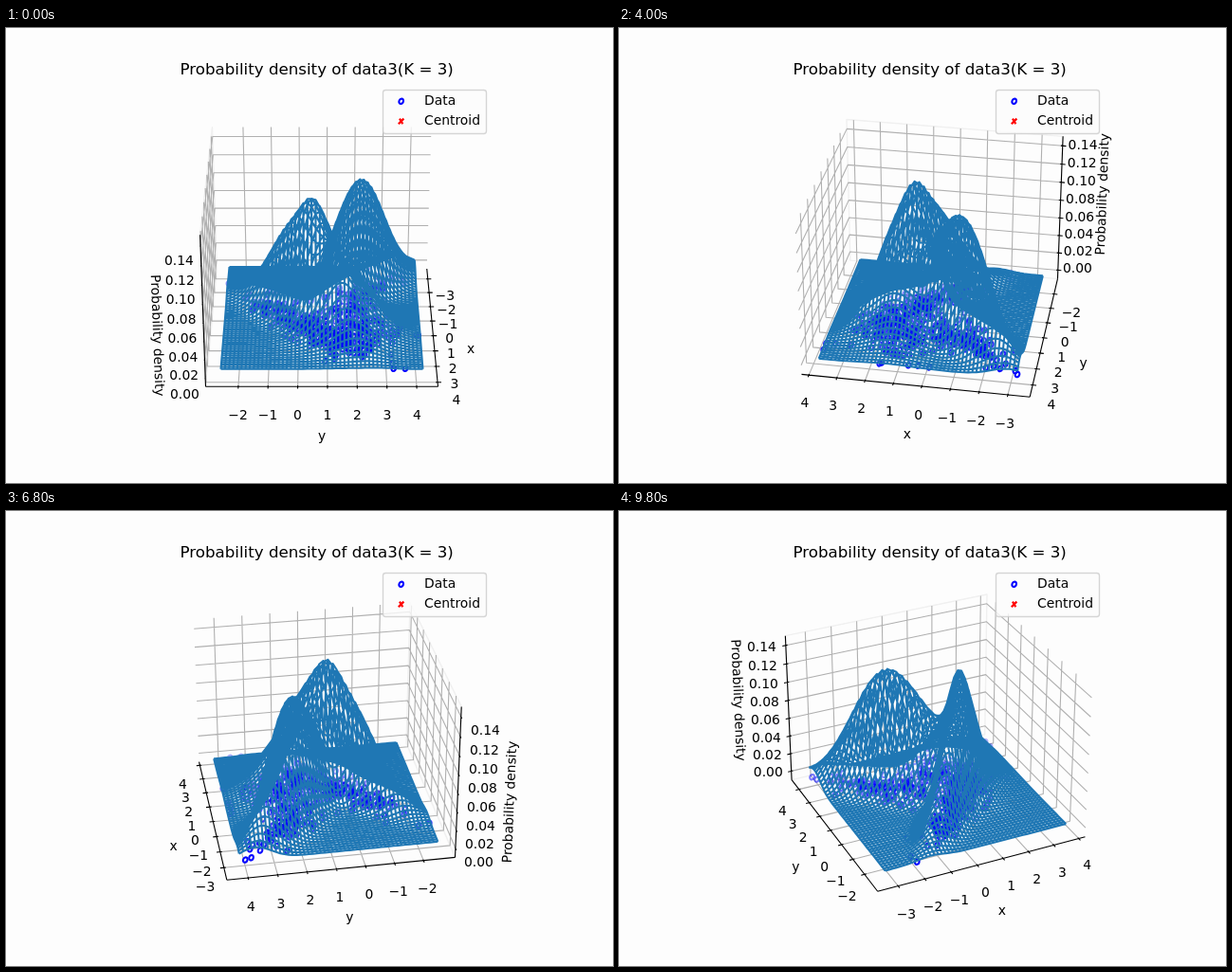
These frames come from a looping animation (640x480 px, 10 s). An HTML page with a canvas:

```html
<!DOCTYPE html>
<html lang="en">
<head>
<meta charset="utf-8">
<title>Probability density</title>
<style>
  html, body { margin: 0; width: 100%; height: 100%; overflow: hidden; background: #fdfdfd; }
  canvas { display: block; }
</style>
</head>
<body>
<canvas id="stage" width="640" height="480"></canvas>
<script>
const ctx = document.getElementById('stage').getContext('2d');
const FRAMES = 50, STEP_MS = 200, STEP_DEG = 5;
const WIRE = '#1f77b4', FONT = '"DejaVu Sans", sans-serif';
const rad = deg => deg * Math.PI / 180;

// Box in view units, centred on the origin; the panes are 1/24 larger than the limits.
const LIMIT = [4 / 7, 4 / 7, 3 / 7];
const PANE = LIMIT.map(v => v * 25 / 24);
const DATA = LIMIT.map(v => v / 1.1);
const DELTA = LIMIT.map(v => v / 6);
const PER_POINT = 48 / 532.2;

const range = (from, to) => Array.from({ length: to - from + 1 }, (_, i) => from + i);
const signed = n => String(n).replace('-', '\u2212');
const AXES = [
  { name: 'x', tickDir: 1, flip: 1, ticks: range(-3, 4).map(n => [(n - 0.25) * 0.1484, signed(n)]) },
  { name: 'y', tickDir: 0, flip: 0, ticks: range(-2, 4).map(n => [(n - 0.81) * 0.1523, signed(n)]) },
  { name: 'Probability density', tickDir: 0, flip: 0,
    ticks: range(0, 7).map(n => [DATA[2] * (n / 3.5 - 1), (n * 0.02).toFixed(2)]) }
];

const CLUSTERS = [
  { x: 0.065, y: -0.115, turn: 47, long: 0.205, wide: 0.056, peak: 0.81, count: 160 },
  { x: -0.18, y: 0.2, turn: 140, long: 0.2, wide: 0.066, peak: 0.97, count: 115 },
  { x: 0.16, y: 0.15, turn: 90, long: 0.14, wide: 0.125, peak: 0.45, count: 190 }
].map(c => ({ ...c, cos: Math.cos(rad(c.turn)), sin: Math.sin(rad(c.turn)) }));

const density = (x, y) => CLUSTERS.reduce((sum, c) => {
  const dx = x - c.x, dy = y - c.y;
  const a = (dx * c.cos + dy * c.sin) / c.long, b = (dy * c.cos - dx * c.sin) / c.wide;
  return sum + c.peak * Math.exp(-(a * a + b * b) / 2);
}, 0);

function makeRandom(seed) {
  return () => {
    seed = (seed + 0x6d2b79f5) | 0;
    let t = Math.imul(seed ^ (seed >>> 15), 1 | seed);
    t = (t + Math.imul(t ^ (t >>> 7), 61 | t)) ^ t;
    return ((t ^ (t >>> 14)) >>> 0) / 4294967296;
  };
}

function makePoints() {
  const random = makeRandom(11);
  const points = [[-0.515, 0.488], [-0.5, 0.455], [-0.34, -0.515], [0.515, 0.37], [0.515, 0.43],
    [-0.06, 0.5], [0, 0.495], [0.05, 0.5], [0.2, 0.51], [0.19, 0.5]];
  for (const c of CLUSTERS) {
    for (let i = 0; i < c.count; i++) {
      const r = Math.sqrt(-2 * Math.log(1 - random())), t = random() * 2 * Math.PI;
      const a = r * Math.cos(t) * c.long, b = r * Math.sin(t) * c.wide;
      const x = c.x + a * c.cos - b * c.sin, y = c.y + a * c.sin + b * c.cos;
      if (Math.max(Math.abs(x), Math.abs(y)) < 0.48) points.push([x, y]);
    }
  }
  return points.map(([x, y]) => [x, y, -DATA[2]]);
}

function makeMesh(n) {
  const at = i => DATA[0] * (2 * i / (n - 1) - 1);
  const index = range(0, n - 1);
  const heights = index.map(i => index.map(j => density(at(i), at(j))));
  const top = Math.max(...heights.flat());
  const vertex = (i, j) => [at(i), at(j), DATA[2] * (2 * heights[i][j] / top - 1)];
  return [...index.map(i => index.map(j => vertex(i, j))),
          ...index.map(j => index.map(i => vertex(i, j)))];
}

const points = makePoints();
const mesh = makeMesh(50);

function makeCamera(azimuth) {
  const c = Math.cos(azimuth), s = Math.sin(azimuth), ce = Math.cos(rad(30)), se = 0.5;
  const project = ([x, y, z]) => {
    const toward = x * c + y * s;
    const depth = 10 - toward * ce - z * se;
    const scale = 369.6 / 0.185 / depth;
    return [333 + (y * c - x * s) * scale, 237.4 - (z * ce - toward * se) * scale, depth];
  };
  // Sign of the pane behind the box along each axis
  const back = [c, s, 1].map(v => (v > -1e-9 ? -1 : 1));
  return { project, back };
}

const withValue = (p, i, v) => p.map((old, k) => (k === i ? v : old));
const outward = (p, axis, points) =>
  p.map((v, k) => (k === axis ? v : v + Math.sign(v) * points * PER_POINT * DELTA[k]));

function strokePaths(paths, color, width) {
  ctx.strokeStyle = color;
  ctx.lineWidth = width;
  ctx.beginPath();
  for (const path of paths) path.forEach(([x, y], k) => (k ? ctx.lineTo(x, y) : ctx.moveTo(x, y)));
  ctx.stroke();
}

function text(str, x, y, size = 13.89, align = 'center') {
  ctx.font = `${size}px ${FONT}`;
  ctx.textAlign = align;
  ctx.fillStyle = '#000';
  ctx.fillText(str, x, y);
}

function drawPanes({ project, back }) {
  const corner = PANE.map((v, k) => v * back[k]);
  const y = corner[1], [w, , h] = PANE;
  const pane = [[-w, y, -h], [w, y, -h], [w, y, h], [-w, y, h], [-w, y, -h]];
  strokePaths([pane.map(project)], '#f0f0f0', 1.39);

  const lines = AXES.flatMap(({ ticks }, i) => ticks.map(([value]) => {
    const bend = withValue(corner, i, value);
    const j = (i + 1) % 3, k = (i + 2) % 3;
    return [withValue(bend, j, -corner[j]), bend, withValue(bend, k, -corner[k])].map(project);
  }));
  strokePaths(lines, '#b0b0b0', 1.11);
}

function drawAxis({ project, back }, { name, tickDir, flip, ticks }, i) {
  const corner = PANE.map((v, k) => v * back[k]);
  const start = withValue(corner, flip, -corner[flip]);
  const from = project(start), to = project(withValue(start, i, -start[i]));
  const side = Math.sign(start[tickDir]) * DELTA[tickDir];
  const paths = [[from, to]];

  for (const [value, label] of ticks) {
    const pos = withValue(start, i, value);
    paths.push([-0.1, 0.2].map(f => project(withValue(pos, tickDir, pos[tickDir] + f * side))));
    const [x, y] = project(outward(pos, i, 11.5));
    text(label, x, y + 10.6);
  }
  strokePaths(paths, '#000', 1.11);

  const [x, y] = project(outward(withValue(start, i, 0), i, 25));
  ctx.save();
  ctx.translate(x, y);
  if (i === 2) ctx.rotate(Math.atan((to[1] - from[1]) / (to[0] - from[0])));
  text(name, 0, 3.8);
  ctx.restore();
}

function ring(x, y) {
  ctx.beginPath();
  ctx.ellipse(x, y, 2.2, 2.8, 0.45, 0, 2 * Math.PI);
  ctx.stroke();
}

function drawPoints({ project }) {
  const seen = points.map(project).sort((a, b) => b[2] - a[2]);
  const far = seen[0][2], near = seen[seen.length - 1][2];
  ctx.strokeStyle = '#00f';
  ctx.lineWidth = 2.1;
  for (const [x, y, depth] of seen) {
    ctx.globalAlpha = 1 - 0.7 * (depth - near) / (far - near);
    ring(x, y);
  }
  ctx.globalAlpha = 1;
}

function drawLegend() {
  ctx.beginPath();
  ctx.roundRect(397.5, 65.5, 109, 46, 2.8);
  ctx.fillStyle = 'rgba(253,253,253,0.8)';
  ctx.fill();
  ctx.strokeStyle = 'rgba(204,204,204,0.8)';
  ctx.lineWidth = 1.39;
  ctx.stroke();
  ctx.strokeStyle = '#00f';
  ctx.lineWidth = 2.1;
  ring(416.7, 77.3);
  strokePaths([[[415, 95.6], [418.3, 101.2]], [[419.4, 95.6], [413.8, 101.2]]], '#f00', 2.2);
  text('Data', 441, 81.3, 13.89, 'left');
  text('Centroid', 441, 102, 13.89, 'left');
}

function draw(frame) {
  const camera = makeCamera(rad(frame * STEP_DEG));
  ctx.fillStyle = '#fdfdfd';
  ctx.fillRect(0, 0, 640, 480);
  ctx.lineJoin = 'round';
  drawPanes(camera);
  AXES.forEach((axis, i) => drawAxis(camera, axis, i));
  drawPoints(camera);
  strokePaths(mesh.map(line => line.map(camera.project)), WIRE, 2.08);
  text('Probability density of data3(K = 3)', 327.7, 49, 16.67);
  drawLegend();
}

const startTime = performance.now();
let shown = -1;
function tick() {
  const frame = Math.floor((performance.now() - startTime) / STEP_MS) % FRAMES;
  if (frame !== shown) draw(shown = frame);
  requestAnimationFrame(tick);
}
tick();
</script>
</body>
</html>
```
